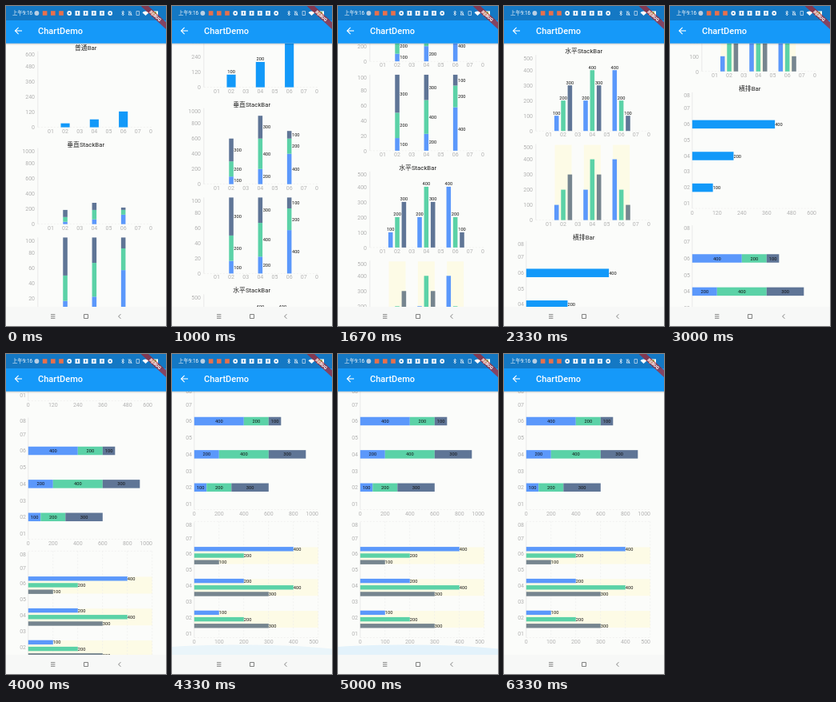
Animation, 200 px wide and 400 px high, one loop 6.48 s. Source, as an HTML page with a canvas:

```html
<!DOCTYPE html>
<html lang="zh">
<head>
<meta charset="utf-8">
<title>ChartDemo</title>
<style>
html, body { margin: 0; width: 100%; height: 100%; overflow: hidden; background: #fbfcfa; }
canvas { display: block; width: 200px; height: 400px; }
</style>
</head>
<body>
<canvas id="stage"></canvas>
<script>
const canvas = document.getElementById('stage');
const ctx = canvas.getContext('2d');
const ratio = window.devicePixelRatio || 1;
canvas.width = 200 * ratio;
canvas.height = 400 * ratio;

const LOOP = 6480;
const FONT = 'Roboto, "Noto Sans CJK SC", "Noto Sans CJK", sans-serif';
const BLUE = '#5b98fb', GREEN = '#5bd2a7', SLATE = '#5f7596', GREY = '#76858f';
const PLAIN = '#1299f9', STATUS = '#1478c4', BAND = '#fdfbe6';
const STACK = [BLUE, GREEN, SLATE];
const GROUP = [BLUE, GREEN, GREY];

// Pixels per device unit; the screen is slightly squeezed vertically.
const UX = 0.556, UY = 0.513;
const BAR_TOP = 18, BODY_TOP = BAR_TOP + 56 * UY, BODY_END = 376;

// Values for the categories 02, 04 and 06.
const DATA = [[100, 200, 300], [200, 400, 300], [400, 200, 100]];
const SINGLE = [100, 200, 400];

// The screen refreshes at these times: [ms, scroll offset, glow strength].
const STEPS = [
  [0, 0, 0], [330, 0, 0], [670, 0, 0], [1000, 50, 0], [1330, 140, 0],
  [1670, 203.5, 0], [2000, 277, 0], [2330, 349.2, 0], [2670, 440, 0],
  [3000, 535, 0], [3330, 623.5, 0], [3670, 684, 0], [4000, 729.5, 0],
  [4330, 766.5, 0.7], [4670, 766.5, 1], [5000, 766.5, 1],
  [5330, 766.5, 0.4], [5670, 766.5, 0]
];

let grow = 1, labelled = true;

function rect(x, y, w, h, color) {
  ctx.fillStyle = color;
  ctx.fillRect(x, y, w, h);
}

function text(str, x, y, size, color, align = 'center', weight = 400) {
  ctx.font = `${weight} ${size}px ${FONT}`;
  ctx.textAlign = align;
  ctx.textBaseline = 'alphabetic';
  ctx.fillStyle = color;
  ctx.fillText(str, x, y + size * 0.355);
}

function line(points, color, width = 0.6, dash = []) {
  ctx.beginPath();
  points.forEach(([x, y], i) => i ? ctx.lineTo(x, y) : ctx.moveTo(x, y));
  ctx.strokeStyle = color;
  ctx.lineWidth = width;
  ctx.setLineDash(dash);
  ctx.stroke();
  ctx.setLineDash([]);
}

function disc(x, y, r, color) {
  ctx.beginPath();
  ctx.arc(x, y, r, 0, Math.PI * 2);
  ctx.fillStyle = color;
  ctx.fill();
}

function clipBody() {
  ctx.beginPath();
  ctx.rect(0, BODY_TOP, 200, BODY_END - BODY_TOP);
  ctx.clip();
}

const heading = (str, y) => text(str, 99.7, y, 7.8, '#222');
const axisText = (str, x, y, align) => text(str, x, y, 7, '#b2b2b2', align);
const grid = (a, b) => line([a, b], '#ececea', 0.6, [2, 2]);

function value(v, x, y, align) {
  if (labelled) text(v, x, y, 5.7, '#111', align);
}

// Vertical charts: 95 px high, categories along the bottom.
const LEFT = 39.8, RIGHT = 183, HIGH = 95;
const COLUMN = 20 * UX, THIN_COLUMN = 10 * UX;
const columnX = n => 55.9 + (n - 1) * 18.15;

function columnAxes(base, max) {
  for (let i = 0; i <= 5; i++) {
    const y = base - i * HIGH / 5;
    axisText(max / 5 * i, 36, y + (i === 5 ? 4 : 0.3), 'right');
  }
  line([[LEFT, base - HIGH], [LEFT, base]], '#dededc');
  grid([LEFT, base], [RIGHT, base]);
  ctx.save();
  ctx.beginPath();
  ctx.rect(0, base, RIGHT, 12);
  ctx.clip();
  for (let n = 1; n <= 8; n++) axisText('0' + n, columnX(n), base + 4.5);
  ctx.restore();
}

function columns(base) {
  columnAxes(base, 600);
  SINGLE.forEach((v, i) => {
    const x = columnX(2 + 2 * i), h = v / 600 * HIGH * grow;
    rect(x - COLUMN / 2, base - h, COLUMN, h, PLAIN);
    value(v, x, base - h - 3.5);
  });
}

function stackedColumns(base, percent) {
  columnAxes(base, percent ? 100 : 1000);
  DATA.forEach((row, i) => {
    const x = columnX(2 + 2 * i);
    const total = row.reduce((a, b) => a + b);
    const unit = percent ? HIGH / total : HIGH / 1000 * grow;
    let y = base;
    row.forEach((v, k) => {
      const h = v * unit;
      y -= h;
      rect(x - THIN_COLUMN / 2, y, THIN_COLUMN, h, STACK[k]);
      value(v, x + 3.3, y + h / 2, 'left');
    });
  });
}

function groupedColumns(base, banded) {
  DATA.forEach((row, i) => {
    if (banded) rect(columnX(2 + 2 * i) - 10.5, base - HIGH + 1, 21, HIGH - 1, BAND);
  });
  columnAxes(base, 500);
  DATA.forEach((row, i) => row.forEach((v, k) => {
    const x = columnX(2 + 2 * i) + (k - 1) * 15 * UX, h = v / 500 * HIGH * grow;
    rect(x - THIN_COLUMN / 2, base - h, THIN_COLUMN, h, (banded ? GROUP : STACK)[k]);
    if (!banded) value(v, x, base - h - 3.5);
  }));
}

// Horizontal charts: 155 px wide, "06" sits at y = six.
const START = 27.8, WIDE = 155;
const ROW = 10.5, THIN_ROW = 5.4;

function rowAxes(six, pitch, max, base) {
  for (let n = 1; n <= 8; n++) {
    axisText('0' + n, 25, six + (6 - n) * pitch + (n === 8 ? 3.5 : 0), 'right');
  }
  for (let i = 0; i <= 5; i++) {
    const last = i === 5, x = START + i * WIDE / 5;
    axisText(max / 5 * i, last ? RIGHT : x, base + 5.5, last ? 'right' : 'center');
  }
  line([[START, six - 2 * pitch], [START, base]], '#dededc');
  grid([START, base], [RIGHT, base]);
}

function rows(six, pitch, base) {
  rowAxes(six, pitch, 600, base);
  SINGLE.forEach((v, i) => {
    const y = six + 0.4 + (4 - 2 * i) * pitch, w = v / 600 * WIDE;
    rect(START, y - ROW / 2, w, ROW, PLAIN);
    value(v, START + w, y, 'left');
  });
}

function stackedRows(six, pitch, base) {
  rowAxes(six, pitch, 1000, base);
  DATA.forEach((row, i) => {
    const y = six + (4 - 2 * i) * pitch;
    let x = START;
    row.forEach((v, k) => {
      const w = v / 1000 * WIDE;
      rect(x, y - ROW / 2, w, ROW, STACK[k]);
      value(v, x + w / 2, y);
      x += w;
    });
  });
}

function groupedRows(six, pitch, base) {
  const rowY = i => six + 2 + (4 - 2 * i) * pitch;
  DATA.forEach((row, i) => rect(START, rowY(i) - 10.5, WIDE, 21, BAND));
  for (let i = 1; i <= 5; i++) {
    const x = START + i * WIDE / 5;
    grid([x, six - 2 * pitch - 1], [x, base]);
  }
  grid([START, six - 2 * pitch - 1], [RIGHT, six - 2 * pitch - 1]);
  rowAxes(six, pitch, 500, base);
  DATA.forEach((row, i) => row.forEach((v, k) => {
    const y = rowY(i) + (k - 1) * 8.2, w = v / 500 * WIDE;
    rect(START, y - THIN_ROW / 2, w, THIN_ROW, GROUP[k]);
    value(v, START + w, y, 'left');
  }));
}

function page(scroll) {
  ctx.save();
  clipBody();
  ctx.translate(0, -scroll);
  heading('普通Bar', 52);
  columns(151.6);
  heading('垂直StackBar', 173.5);
  stackedColumns(272.7, false);
  stackedColumns(384.4, true);
  heading('水平StackBar', 405.7);
  groupedColumns(505.4, false);
  groupedColumns(616.8, true);
  heading('横排Bar', 638.5);
  rows(682.5, 19.8, 788);
  stackedRows(850.5, 20.7, 961);
  groupedRows(1016.5, 19.9, 1121);
  ctx.restore();
}

function glow(strength) {
  if (!strength) return;
  ctx.save();
  clipBody();
  ctx.globalAlpha = 0.1 * strength;
  ctx.beginPath();
  ctx.ellipse(85, 381, 165, 17.5, 0, 0, Math.PI * 2);
  ctx.fillStyle = PLAIN;
  ctx.fill();
  ctx.restore();
}

// Notification icons sit at an even pitch.
function notices() {
  for (let i = 0; i < 10; i++) {
    const x = 38.4 + i * 10.2;
    if (i === 0) disc(x, 9, 2.9, '#b9cfe4');
    else if (i < 4) rect(x - 2.8, 6.2, 5.6, 5.6, '#e8704c');
    else if (i === 4 || i === 9) {
      disc(x, 9, 2.9, '#f2f6fa');
      disc(x, 9, 1.1, STATUS);
    } else {
      rect(x - 2.9, 6, 5.8, 6, '#f2f6fa');
      rect(x - 0.6, 7.4, 1.2, 3, STATUS);
    }
  }
}

function statusBar() {
  rect(0, 0, 200, BAR_TOP, STATUS);
  text('上午9:16', 8, 9, 6.4, '#fff', 'left');
  notices();
  line([[144.6, 7.4], [147.6, 10.4], [146, 12], [146, 6], [147.6, 7.6], [144.6, 10.6]], '#fff', 0.7);
  line([[153, 11], [153.8, 10], [153.8, 7.6], [155, 6.6], [156.2, 7.6], [156.2, 10], [157, 11], [153, 11]], '#fff', 0.7);
  line([[152.8, 6.2], [157.4, 11.8]], '#fff', 0.6);
  line([[163, 6.5], [166.5, 6.5], [166.5, 11.5], [163, 11.5], [163, 6.5]], '#dce9f5', 0.7);
  ctx.beginPath();
  ctx.moveTo(174.5, 12);
  ctx.arc(174.5, 12, 5.6, -Math.PI * 0.76, -Math.PI * 0.24);
  ctx.fillStyle = '#fff';
  ctx.fill();
  rect(181, 6.4, 9, 5.4, '#fff');
  rect(182, 7.3, 6, 3.6, '#72cf5b');
}

function appBar() {
  rect(0, BAR_TOP, 200, BODY_TOP - BAR_TOP, '#1599f9');
  line([[20, 31], [11.6, 31]], '#fff', 1.1);
  line([[15.6, 26.9], [11.5, 31], [15.6, 35.1]], '#fff', 1.1);
  text('ChartDemo', 40, 31.5, 11, '#fff', 'left', 500);
  const shade = ctx.createLinearGradient(0, BODY_TOP, 0, BODY_TOP + 2.5);
  shade.addColorStop(0, 'rgba(0,0,0,0.18)');
  shade.addColorStop(1, 'rgba(0,0,0,0)');
  rect(0, BODY_TOP, 200, 2.5, shade);
}

// Drawn in device units around the top right corner.
function ribbon() {
  ctx.save();
  ctx.translate(200, 0);
  ctx.scale(UX, UY);
  ctx.rotate(Math.PI / 4);
  rect(-40, 28, 80, 12, 'rgba(183,28,28,0.68)');
  text('DEBUG', 0, 34, 10.2, '#fff', 'center', 900);
  ctx.restore();
}

function navBar() {
  rect(0, BODY_END, 200, 24, '#f7f8f7');
  [385.7, 388, 390.3].forEach(y => line([[56, y], [61.4, y]], '#666', 0.8));
  ctx.strokeStyle = '#666';
  ctx.lineWidth = 0.8;
  ctx.strokeRect(97.6, 385.6, 4.8, 4.8);
  line([[143.4, 385.2], [140.6, 388], [143.4, 390.8]], '#666', 0.8);
}

function draw(now) {
  const t = now % LOOP;
  const [at, scroll, shine] = STEPS.filter(s => s[0] <= t).pop();
  grow = Math.min(1, 0.312 + at / 1000);
  labelled = grow === 1;
  ctx.setTransform(ratio, 0, 0, ratio, 0, 0);
  rect(0, 0, 200, 400, '#fbfcfa');
  page(scroll);
  glow(shine);
  statusBar();
  appBar();
  ribbon();
  navBar();
}

function tick() {
  draw(performance.now());
  requestAnimationFrame(tick);
}
tick();
</script>
</body>
</html>
```
